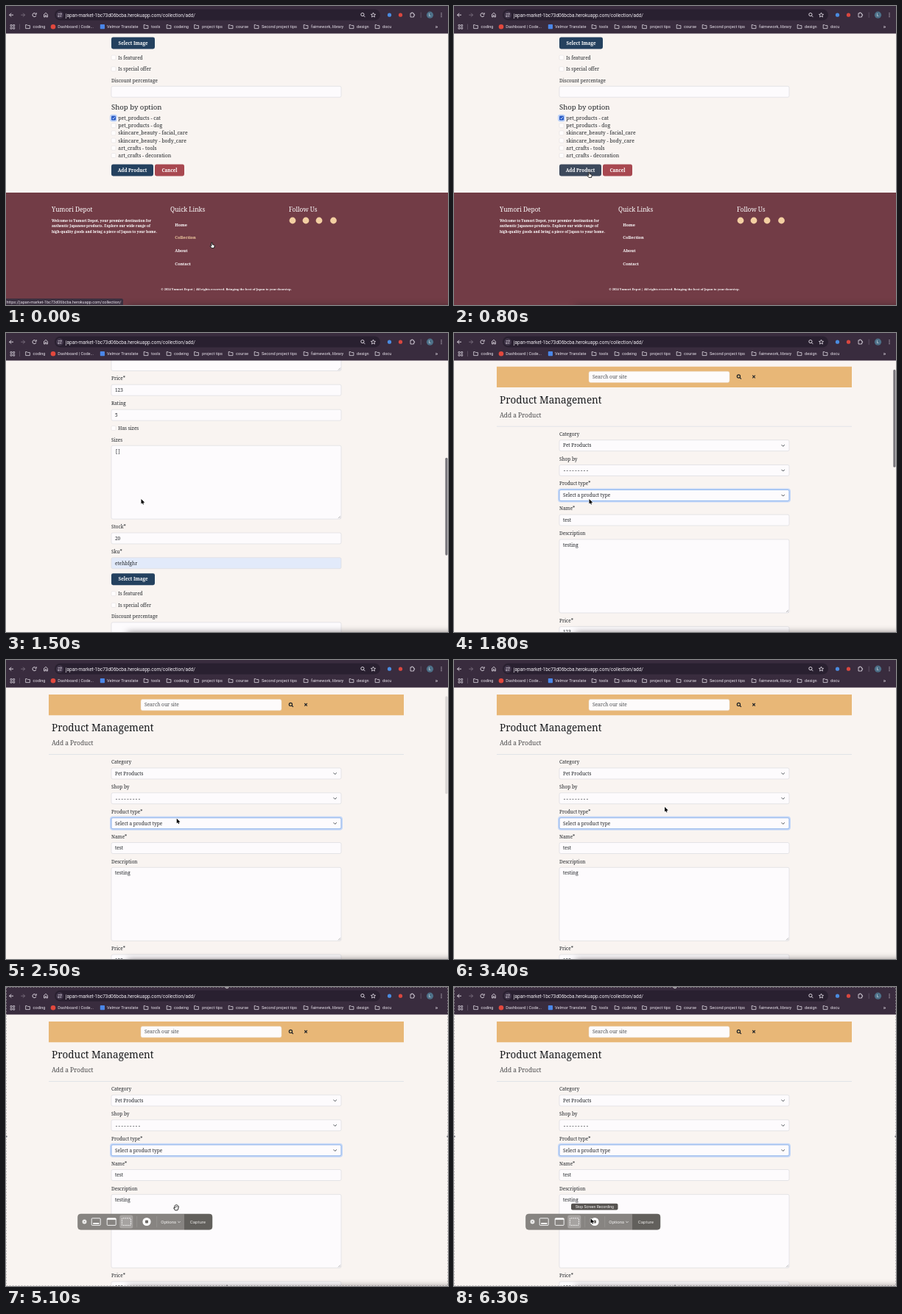
An HTML page with a canvas that plays this animation: 600x407 px, repeating every 6400 ms.

```html
<!DOCTYPE html>
<html lang="en">
<head>
<meta charset="utf-8">
<title>Add a product</title>
<style>
html, body { margin: 0; width: 100%; height: 100%; overflow: hidden; background: #f9f4f1; }
canvas { display: block; width: 600px; height: 407px; }
</style>
</head>
<body>
<canvas id="stage"></canvas>
<script>
const W = 600, H = 407, LOOP = 6400, STEP = 100, BOTTOM = 615.5;
const SERIF = '"Noto Serif", serif', SANS = 'Roboto, "Open Sans", sans-serif', MONO = '"Noto Sans Mono", monospace';
const INK = '#212529', LIGHT = '#e9e3ec', PEACH = '#f3cfa2', NAVY = '#24415f';
const URL_HOST = 'japan-market-1bc73d06bcba.herokuapp.com/';
const canvas = document.getElementById('stage');
const dpr = window.devicePixelRatio || 1;
canvas.width = W * dpr;
canvas.height = H * dpr;
const c = canvas.getContext('2d');

const clamp = v => Math.min(1, Math.max(0, v));
const ease = u => (1 - Math.cos(Math.PI * clamp(u))) / 2;

function text(s, x, y, size, color = INK, font = SERIF, weight = 500, align = 'left') {
  c.font = `${weight} ${size}px ${font}`;
  c.fillStyle = color;
  c.textAlign = align;
  c.fillText(s, x, y);
}

const ui = (s, x, y, size, color = LIGHT, align = 'left') => text(s, x, y, size, color, SANS, 400, align);

function rect(x, y, w, h, fill, r = 0, stroke = null, lw = 0.7) {
  c.beginPath();
  c.roundRect(x, y, w, h, r);
  if (fill) { c.fillStyle = fill; c.fill(); }
  if (stroke) { c.strokeStyle = stroke; c.lineWidth = lw; c.stroke(); }
}

function disc(x, y, r, fill) {
  c.beginPath();
  c.arc(x, y, r, 0, Math.PI * 2);
  c.fillStyle = fill;
  c.fill();
}

function ring(x, y, r, color, lw = 0.9, a = 0, b = Math.PI * 2) {
  c.beginPath();
  c.arc(x, y, r, a, b);
  c.strokeStyle = color;
  c.lineWidth = lw;
  c.stroke();
}

function path(pts, color, lw = 0.9, fill = null) {
  c.beginPath();
  pts.forEach(([x, y], i) => i ? c.lineTo(x, y) : c.moveTo(x, y));
  if (fill) { c.closePath(); c.fillStyle = fill; c.fill(); }
  if (color) { c.strokeStyle = color; c.lineWidth = lw; c.stroke(); }
}

function lens(x, y, color, lw) {
  ring(x - 0.6, y - 0.6, 2.1, color, lw);
  path([[x + 1, y + 1], [x + 2.9, y + 2.9]], color, lw);
}

// ---------- browser bar ----------

function folder(x) {
  path([[x - 2.8, 25.7], [x - 0.8, 25.7], [x, 26.6], [x + 2.9, 26.6], [x + 2.9, 30.6], [x - 2.8, 30.6], [x - 2.8, 25.4]], LIGHT, 0.75);
}

const BOOKMARKS = [
  [29.5, 36.5, 'coding'], [190, 197, 'tools'], [221, 228, 'codeing'], [258.5, 266, 'project tips'],
  [305, 312, 'course'], [340, 347, 'Second project tips'], [407, 414, 'faimework, library'],
  [469, 476, 'design'], [504, 511, 'docu']
];

function browserBar() {
  rect(0, 0, W, 37.5, '#392c3e');
  rect(66, 4.5, 442, 15, '#292030', 7.5);

  path([[10, 12.2], [4.6, 12.2]], LIGHT);
  path([[7.1, 9.7], [4.6, 12.2], [7.1, 14.7]], LIGHT);
  path([[20.4, 12.2], [25.6, 12.2]], '#7d7282');
  path([[23.1, 9.7], [25.6, 12.2], [23.1, 14.7]], '#7d7282');
  ring(38.5, 12.2, 2.5, LIGHT, 0.9, 0.3, 5.6);
  path([[41.3, 9.2], [41.3, 11.3], [39.2, 11.3]], LIGHT, 0.8);
  path([[51.6, 11.5], [54, 9.3], [56.4, 11.5], [56.4, 15], [54.8, 15], [54.8, 12.8], [53.2, 12.8], [53.2, 15], [51.6, 15], [51.6, 11.2]], LIGHT, 0.8);

  disc(73, 12.2, 5, '#41364a');
  path([[70.6, 10.8], [73, 10.8]], LIGHT, 0.8);
  path([[73, 13.8], [75.4, 13.8]], LIGHT, 0.8);
  ring(74.6, 10.8, 0.8, LIGHT, 0.7);
  ring(71.4, 13.8, 0.8, LIGHT, 0.7);
  ui(URL_HOST + 'collection/add/', 81, 14.5, 6.48, '#f1edf3');

  lens(484.5, 12.2, LIGHT, 0.9);
  const star = [];
  for (let i = 0; i <= 10; i++) {
    const r = i % 2 ? 1.5 : 3.3, a = -Math.PI / 2 + i * Math.PI / 5;
    star.push([498.5 + r * Math.cos(a), 12.4 + r * Math.sin(a)]);
  }
  path(star, LIGHT, 0.8);
  disc(520.5, 12.2, 2.6, '#4a8be0');
  disc(535.5, 12.2, 2.6, '#d9473f');
  path([[549, 10], [550.6, 10], [550.6, 9], [552.2, 9], [552.2, 10], [553.6, 10], [553.6, 11.6], [554.6, 11.6], [554.6, 13.1], [553.6, 13.1], [553.6, 15], [549, 15], [549, 9.7]], LIGHT, 0.8);
  rect(562.8, 8.5, 0.7, 7.5, '#6a5c70');
  disc(575.5, 12.2, 4.6, '#4d7088');
  ui('L', 575.5, 14.1, 5.2, '#fff', 'center');
  for (const y of [9.8, 12.2, 14.6]) disc(591, y, 0.65, LIGHT);

  for (const x of [6, 9.6]) for (const y of [25.5, 29.1]) rect(x, y, 2.1, 2.1, null, 0.2, LIGHT, 0.7);
  rect(18.3, 24.5, 0.7, 7.5, '#6a5c70');
  for (const [ix, tx, s] of BOOKMARKS) {
    folder(ix);
    ui(s, tx, 30.2, 5.62);
  }
  disc(64, 28.2, 3.3, '#e2483d');
  ui('Dashboard | Code...', 70.3, 30.2, 5.62);
  rect(127.8, 25, 6.2, 6.2, '#4a86e8', 0.8);
  ui('Velmor Translate', 137, 30.2, 5.62);
  ui('»', 582.5, 30.5, 8);
}

// ---------- page ----------

const BORDER = '#dcdbe0', FIELD = '#fdfbfd';

function field(label, labelY, y, value, h = 15, fill = FIELD, font = SERIF) {
  text(label, 143, labelY, 6.46);
  rect(143, y, 312, h, fill, 2, BORDER);
  text(value, 148, y + 9.8, 6.46, INK, font);
  if (h > 20) {
    path([[454, y + h - 4], [451, y + h - 1]], '#888', 0.6);
    path([[454, y + h - 2], [453, y + h - 1]], '#888', 0.6);
  }
}

function dropdown(label, labelY, y, value, focus, font) {
  if (focus) rect(142, y - 1, 314, 17, null, 3, '#c5d8f8', 2);
  field(label, labelY, y, value, 15, FIELD, font);
  if (focus) rect(143, y, 312, 15, null, 2, '#86b1f2', 0.9);
  path([[444.6, y + 6.5], [446.7, y + 8.6], [448.8, y + 6.5]], '#343a40', 0.9);
}

function check(label, y, size, on, focus) {
  if (focus) rect(141.9, y - 4, 8, 8, null, 2, '#b4cdfa', 1.5);
  rect(143, y - 3, 6, 6, on ? (focus ? '#2458c6' : '#2f67dd') : '#fffdfd', 1.3, on ? null : '#e2dfe1', 0.6);
  if (on) path([[144.4, y], [145.6, y + 1.3], [147.7, y - 1.3]], '#fff', 0.9);
  text(label, 152.3, y + 2.4, size);
}

function button(label, x, y, w, fill) {
  rect(x, y, w, 16, fill, 2.4);
  text(label, x + w / 2, y + 10.2, 6.25, '#fff', SERIF, 600, 'center');
}

const OPTIONS = ['pet_products - cat', 'pet_products - dog', 'skincare_beauty - facial_care',
  'skincare_beauty - body_care', 'art_crafts - tools', 'art_crafts - decoration'];

function form(s) {
  rect(58, 47, 482, 28.3, '#e8b777');
  rect(183, 53.5, 191, 15.3, '#fdfbfb', 2.4, '#e4d3bd', 0.5);
  text('Search our site', 188, 63, 6.6, '#4a4d52');
  lens(387, 61, INK, 1.2);
  path([[405.2, 59], [408.8, 62.6]], INK, 1.1);
  path([[408.8, 59], [405.2, 62.6]], INK, 1.1);

  text('Product Management', 62, 97, 13.5, '#191b1e');
  text('Add a Product', 62, 116.3, 8.4, '#4a4a4c');
  rect(58, 128, 482, 0.8, '#d9dee6');

  dropdown('Category', 141.2, 147, 'Pet Products');
  dropdown('Shop by', 175, 180.8, '---------', false, MONO);
  dropdown('Product type*', 208.7, 214.8, 'Select a product type', s.picked);
  field('Name*', 242.6, 248.5, 'test');
  field('Description', 276.5, 282.3, 'testing', 100);
  field('Price*', 395, 401, '123');
  field('Rating', 429, 435, '5');
  check('Has sizes', 460.3, 6.46);
  text('Sizes', 143, 478.5, 6.46);
  field('', 0, 484, '[]', 100, FIELD, MONO);
  field('Stock*', 597, 602.8, '20');
  field('Sku*', 631, 636.6, 'etehbfghr', 15, '#e2eafa');
  button('Select Image', 143, 658, 59, NAVY);
  check('Is featured', 685.6, 6.46);
  check('Is special offer', 701.3, 6.46);
  field('Discount percentage', 719, 724.7, '');

  text('Shop by option', 143, 756.6, 9.6);
  OPTIONS.forEach((o, i) => check(o, 768 + i * 10.2, 6.87, i === 0, i === 0 && !s.picked));
  button('Add Product', 143, 831, 57, s.onButton ? '#3d495c' : NAVY);
  button('Cancel', 202, 831, 40, '#a84850');
}

function footer(s) {
  rect(0, 869.5, W, 160, '#723c46');
  const head = (t, x) => text(t, x, 895.5, 8.35, '#fff');
  const bold = (t, x, y, size, color = '#fff', align = 'left') => text(t, x, y, size, color, SERIF, 700, align);
  head('Yumori Depot', 62);
  head('Quick Links', 223);
  head('Follow Us', 384);
  ['Welcome to Yumori Depot, your premier destination for',
   'authentic Japanese products. Explore our wide range of',
   'high-quality goods and bring a piece of Japan to your home.'
  ].forEach((t, i) => bold(t, 62, 909.2 + i * 7.6, 4.75));
  ['Home', 'Collection', 'About', 'Contact'].forEach((t, i) =>
    bold(t, 229.3, 915 + i * 17.9, 5.55, i === 1 && s.onLink ? PEACH : '#fff'));
  for (const x of [389, 407, 425, 444.5]) disc(x, 907.5, 4.4, PEACH);
  bold('© 2024 Yumori Depot | All rights reserved. Bringing the best of Japan to your doorstep.',
    299, 1002.5, 4.06, '#fff', 'center');
}

function scrollbar(t, y) {
  if (t < 1211) return;
  c.globalAlpha = 1 - clamp((t - 2200) / 400);
  rect(596.3, 49.3 + 0.364 * y, 3.2, 133, '#77747a', 1.6);
  c.globalAlpha = 1;
}

// Soft shade cast on the lower edge by a window below the stage.
function lowerShade() {
  c.save();
  c.shadowColor = 'rgba(40, 32, 38, 0.6)';
  c.shadowBlur = 10 * dpr;
  rect(165, H + 1, W, 20, '#222');
  c.restore();
}

// ---------- screen recorder ----------

function dashes() {
  const box = (color, off) => {
    c.setLineDash([2, 2]);
    c.lineDashOffset = off;
    rect(0.5, 0.5, W - 1, H - 1, null, 0, color, 0.8);
  };
  box('rgba(255, 255, 255, 0.5)', 0);
  box('rgba(80, 75, 82, 0.45)', 2);
  c.setLineDash([]);
  for (const [x, y] of [[0.5, 203.5], [300, 0.5], [599.5, 203.5], [300, 406.5]]) {
    disc(x, y, 1.8, '#fff');
    disc(x, y, 1.2, '#77737a');
  }
}

function recorder(tip) {
  dashes();
  c.save();
  c.beginPath();
  c.roundRect(97.5, 309, 182.5, 21.3, 4);
  c.clip();
  rect(97, 308, 184, 23, '#878481');
  rect(242, 308, 40, 23, '#62605c');
  c.restore();
  rect(97.5, 309, 182.5, 21.3, null, 4, '#6f6c69', 0.5);
  disc(106.5, 319.5, 2.9, '#f3f2f1');
  path([[105.5, 318.5], [107.5, 320.5]], '#777', 0.7);
  path([[107.5, 318.5], [105.5, 320.5]], '#777', 0.7);

  rect(154.3, 310.6, 18, 18, '#a6a3a1', 2.5);
  rect(116.2, 314.8, 12, 9.6, null, 1, '#fff', 0.9);
  rect(118, 321, 8.4, 1.8, '#fff', 0.4);
  rect(137.2, 314.8, 12, 9.6, null, 1, '#fff', 0.9);
  rect(137.2, 314.8, 12, 2, '#fff', 0.5);
  c.setLineDash([1.7, 1.1]);
  rect(157.4, 314.8, 12, 9.6, null, 0.6, '#fff', 0.9);
  c.setLineDash([]);
  for (const x of [177.5, 204.5]) rect(x, 312, 0.6, 15, '#9d9a97');
  disc(191, 319.5, 5.6, '#fff');
  rect(189, 317.5, 4, 4, '#6d6a67', 0.7);
  ui('Options', 210.3, 321.7, 6.05, '#f2f1f0');
  path([[233.3, 319], [235, 320.7], [236.7, 319]], '#f2f1f0', 0.8);
  ui('Capture', 249.8, 321.7, 6.05, '#e6e4e2');

  if (tip) {
    rect(159, 294.8, 63.5, 8.8, '#55524f', 2);
    ui('Stop Screen Recording', 190.8, 301, 5.2, '#f4f3f2', 'center');
  }
}

// ---------- pointer ----------

// [start, end, x, y]: each leg eases to its point.
const LEGS = [[100, 800, 183.5, 226], [2200, 2600, 240, 214], [2800, 3000, 286, 200],
  [4600, 5000, 231, 297], [5300, 5800, 185.5, 315]];

function pointerAt(t) {
  let x = 279.5, y = 322;
  for (const [a, b, tx, ty] of LEGS) {
    const u = ease((t - a) / (b - a));
    x += (tx - x) * u;
    y += (ty - y) * u;
  }
  return [x, y];
}

function pointer(x, y, kind) {
  c.save();
  c.translate(x, y);
  c.lineJoin = 'round';
  if (kind === 'arrow') {
    const arrow = [[0, 0], [0, 6.6], [1.5, 5.3], [2.5, 7.6], [3.5, 7.1], [2.6, 4.9], [4.7, 4.8], [0, 0]];
    path(arrow, '#fff', 1.2);
    path(arrow, null, 0, '#000');
  } else if (kind === 'finger') {
    path([[-0.7, 0], [0.5, 0], [0.7, 2.7], [3, 3.3], [3.6, 4.2], [3.1, 7.4], [-0.5, 7.4], [-2.7, 4.6], [-2, 4], [-0.7, 5], [-0.7, 0]], '#111', 0.9, '#fff');
  } else {
    path([[-1.6, 0.4], [-0.6, -0.3], [0.5, -0.4], [1.6, 0], [2.6, 0.8], [3.4, 1.9], [2.7, 5], [1.8, 6.9], [-1.5, 6.9], [-3.4, 3.9], [-2.8, 3.2], [-1.6, 4], [-2.3, 1.2], [-1.6, 0.4]], '#111', 0.9, '#fff');
    for (const dx of [-0.6, 0.6, 1.7]) path([[dx, 0.9], [dx + 0.1, 2.8]], '#111', 0.45);
  }
  c.restore();
}

function draw(t) {
  const [px, py] = pointerAt(t);
  const scroll = BOTTOM * (1 - ease((t - 1211) / 607));
  const state = {
    picked: t >= 1200,
    onLink: t < 800 && py > 305.5,
    onButton: t < 2000 && px > 143 && px < 200 && py < 231.5
  };
  c.setTransform(dpr, 0, 0, dpr, 0, 0);
  rect(0, 0, W, H, '#f9f4f1');
  c.save();
  c.translate(0, -scroll);
  form(state);
  footer(state);
  c.restore();
  scrollbar(t, scroll);
  lowerShade();
  browserBar();

  if (state.onLink) {
    rect(-2, 398.3, 161, 11, '#3a2f3f', 2);
    ui('https://' + URL_HOST + 'collection/', 0.5, 405, 5.5);
  }
  if (t >= 4700) recorder(t >= 6100);

  const overButton = state.onButton && !state.picked;
  const kind = state.onLink || overButton ? 'finger' : t >= 4800 && t < 5500 ? 'hand' : 'arrow';
  pointer(px, py, kind);
}

const start = performance.now();
function tick() {
  const t = (performance.now() - start) % LOOP;
  draw(Math.floor(t / STEP) * STEP);
  requestAnimationFrame(tick);
}
tick();
</script>
</body>
</html>
```
